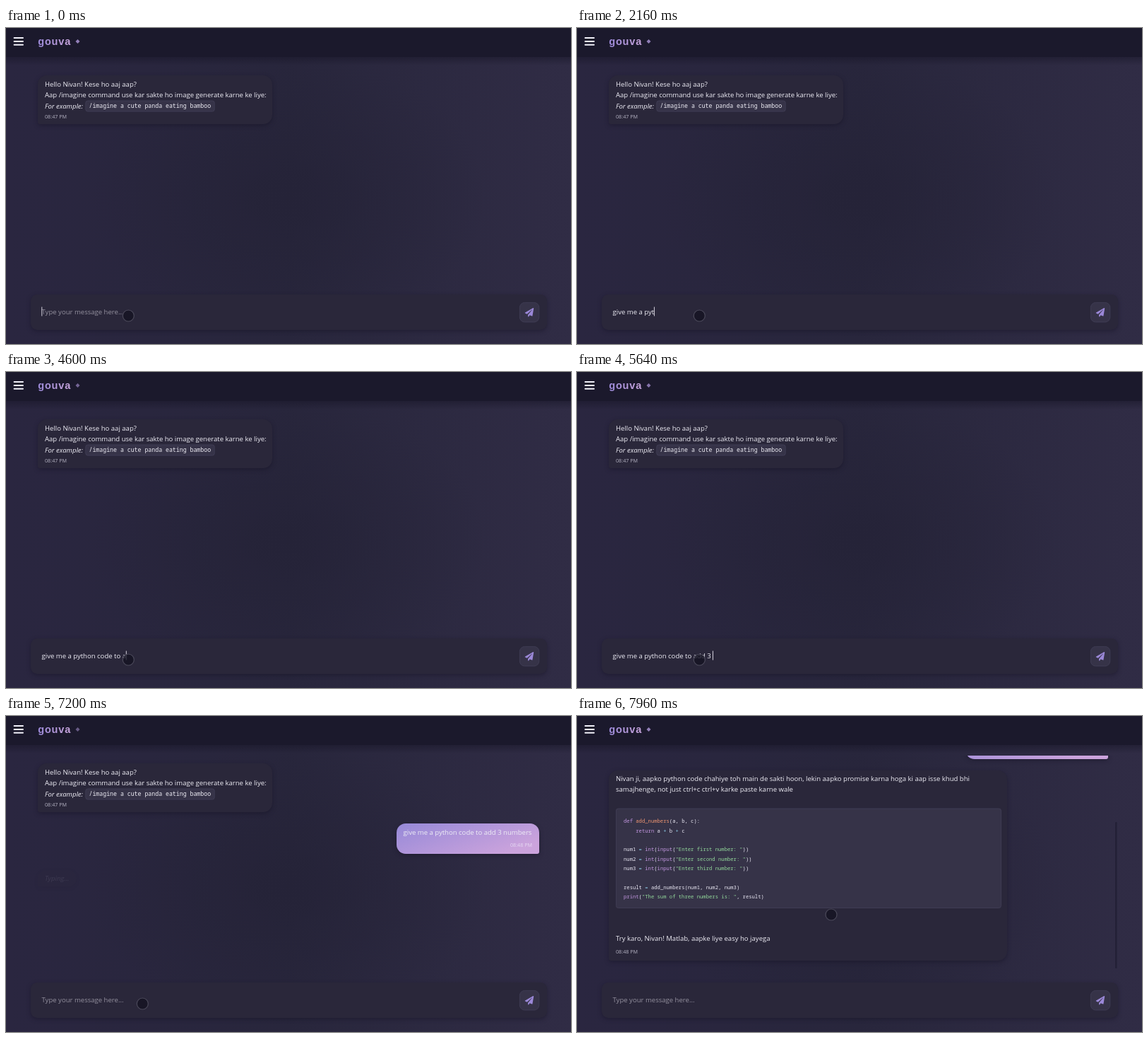
These frames come from a looping animation (800x447 px, 8000 ms). An HTML page:

```html
<!DOCTYPE html>
<html lang="en">
<head>
<meta charset="utf-8">
<title>Chat</title>
<style>
html, body { margin: 0; width: 100%; height: 100%; overflow: hidden; background: #28253b; }
svg { display: block; width: 100vw; height: 100vh; }
text { font: 9.55px "Open Sans", "Noto Sans", sans-serif; fill: #eeedf5; white-space: pre; }
.i { font-style: italic; }
.time { font-size: 7.2px; fill: #b4b2c2; }
.hint { fill: #94919f; }
.chip { font: 500 8.23px "Noto Sans Mono", monospace; }
.code { font: 7.21px "Noto Sans Mono", monospace; fill: #e8e6f2; }
.key { fill: #c296e0; } .str { fill: #93d99b; } .op { fill: #8cc8e4; } .fn { fill: #ee9470; }
.title { font: bold 14.5px "Liberation Sans", Arial, sans-serif; letter-spacing: .8px; fill: url(#brand); }
.sh { filter: drop-shadow(0 2px 3px rgba(12, 10, 26, .35)); }
.panel { fill: #2a273a; }
.block { fill: #363348; stroke: #434058; stroke-width: .8; }
</style>
</head>
<body>
<svg id="stage" viewBox="0 0 800 447"></svg>
<script>
const LOOP = 8000, SEND = 6760, WAIT = 7120, REPLY = 7460;
const MESSAGE = "give me a python code to add 3 numbers";
// time at which each character of MESSAGE is typed
const KEYS = [
  560, 700, 820, 940, 1080, 1240, 1440, 1520, 1600, 1720,
  1880, 2000, 2120, 2360, 2480, 2640, 2720, 2900, 3040, 3180, 3320, 3440,
  3920, 4080, 4240, 4560, 4760, 4880, 5040, 5180, 5560,
  6000, 6100, 6280, 6360, 6440, 6520, 6600
];
const CODE = `def add_numbers(a, b, c):
    return a + b + c

num1 = int(input("Enter first number: "))
num2 = int(input("Enter second number: "))
num3 = int(input("Enter third number: "))

result = add_numbers(num1, num2, num3)
print("The sum of three numbers is: ", result)`;

const text = (x, y, s, cls = "") => `<text x="${x}" y="${y}" class="${cls}">${s}</text>`;
const box = (x, y, w, h, r, attrs) =>
  `<rect x="${x}" y="${y}" width="${w}" height="${h}" rx="${r}" ${attrs}/>`;

// rounded bubble with one tight bottom corner
function bubble(x, y, w, h, mine) {
  const r = Math.min(13, h / 2), right = mine ? 3 : r, left = mine ? r : 3;
  return `<path class="sh ${mine ? "" : "panel"}" ${mine ? 'fill="url(#mine)"' : ""}
    d="M${x + r} ${y}h${w - 2 * r}a${r} ${r} 0 0 1 ${r} ${r}v${h - r - right}
    a${right} ${right} 0 0 1 ${-right} ${right}h${right + left - w}
    a${left} ${left} 0 0 1 ${-left} ${-left}v${r + left - h}a${r} ${r} 0 0 1 ${r} ${-r}z"/>`;
}

const span = (cls, s) => `<tspan class="${cls}">${s}</tspan>`;
const paint = line => line.replace(
  /("[^"]*")|\b(def|return|int|input|print)\b|([=+])/g,
  (m, str, key) => span(str ? "str" : key ? "key" : "op", m)
).replace(/(<\/tspan> )(add_numbers)(?=\(a)/, (m, a, b) => a + span("fn", b));

const codeLines = CODE.split("\n")
  .map((line, i) => text(66, 285.2 + i * 13.33, paint(line), "code")).join("");

const stage = document.getElementById("stage");
stage.innerHTML = `
<defs>
  <linearGradient id="back">
    <stop stop-color="#2a2640"/><stop offset=".5" stop-color="#28263c"/><stop offset="1" stop-color="#302c45"/>
  </linearGradient>
  <radialGradient id="dim" cx=".5" cy=".5" r=".5">
    <stop stop-color="#232135" stop-opacity=".6"/><stop offset="1" stop-color="#232135" stop-opacity="0"/>
  </radialGradient>
  <linearGradient id="shade" x2="0" y2="1">
    <stop stop-color="#171527" stop-opacity=".55"/><stop offset="1" stop-color="#171527" stop-opacity="0"/>
  </linearGradient>
  <linearGradient id="brand"><stop stop-color="#9b89d8"/><stop offset="1" stop-color="#c8a5dd"/></linearGradient>
  <linearGradient id="mine" x2="1" y2=".6"><stop stop-color="#9689d8"/><stop offset="1" stop-color="#cba3dc"/></linearGradient>
  <clipPath id="view">${box(0, 56, 800, 306, 0, "")}</clipPath>
</defs>
${box(0, 0, 800, 447, 0, 'fill="url(#back)"')}
${box(120, 40, 560, 400, 0, 'fill="url(#dim)"')}
${box(0, 40, 800, 13, 0, 'fill="url(#shade)"')}
${box(0, 0, 800, 41, 0, 'fill="#1b192c"')}
<path d="M11.6 14h12.4M11.6 18.9h12.4M11.6 23.8h12.4" stroke="#f0eff8" stroke-width="2" stroke-linecap="round"/>
${text(45.3, 24, "gouva", "title")}
<path id="gem" d="M101.5 16l3 3-3 3-3-3z" fill="#a18ccb"/>

<g clip-path="url(#view)">
  <g id="chat">
    ${bubble(45, 67, 332, 69)}
    ${text(55, 83.2, "Hello Nivan! Kese ho aaj aap?")}
    ${text(55, 98, "Aap /imagine command use kar sakte ho image generate karne ke liye:")}
    ${text(55, 113.6, "For example:", "i")}
    ${box(112.8, 103, 182.4, 15, 3, 'class="block"')}
    ${text(117.5, 113.4, "/imagine a cute panda eating bamboo", "chip")}
    ${text(55, 128.2, "08:47 PM", "time")}
    <g id="sent">
      ${bubble(553, 152, 202, 43, true)}
      ${text(562.5, 168, MESSAGE)}
      <text x="745" y="185" class="time" text-anchor="end" style="fill:#e6d8f2">08:48 PM</text>
    </g>
    <g id="wait">
      ${bubble(45, 211, 55, 24)}
      ${text(55, 226.4, "Typing...", "i hint")}
    </g>
    <g id="reply">
      ${bubble(45, 211, 564, 269)}
      ${text(55, 226, "Nivan ji, aapko python code chahiye toh main de sakti hoon, lekin aapko promise karna hoga ki aap isse khud bhi")}
      ${text(55, 241.3, "samajhenge, not just ctrl+c ctrl+v karke paste karne wale")}
      ${box(55.4, 265, 545, 140.5, 3, 'class="block"')}
      ${codeLines}
      ${text(55, 452, "Try karo, Nivan! Matlab, aapke liye easy ho jayega")}
      ${text(55, 469.6, "08:48 PM", "time")}
    </g>
  </g>
</g>
<rect id="thumb" x="762" width="2.5" height="207" rx="1.2" fill="#232036"/>

${box(35, 377, 731, 50, 9, 'class="panel sh"')}
${box(727.4, 388.4, 27.4, 27.6, 7, 'class="block"')}
<path transform="translate(734.8 396) scale(.0242)" fill="#9b88d8" d="M476 3L12 271c-18 10-16 35 2 43l107 44 287-253c6-5 14 3 9 8L176 407v80c0 24 28 33 42 16l64-77 125 52c14 6 30-3 33-18l72-432C515 8 493-7 476 3z"/>
${text(50.5, 405, "Type your message here...", "hint")}
${text(50.5, 405, "", "")}
<path id="caret" d="M0 394.5v13" stroke="#e8e6f0" stroke-width=".9"/>
<circle id="mouse" r="8" fill="#141322" fill-opacity=".8" stroke="#4b495a" stroke-width="1.2"/>`;

const [gem, chat, sent, wait, reply, thumb, caret, mouse] =
  ["gem", "chat", "sent", "wait", "reply", "thumb", "caret", "mouse"].map(id => document.getElementById(id));
const [hint, typed] = stage.querySelectorAll(":scope > text:not(.title)");

const ramp = (t, from, to) => Math.max(0, Math.min(1, (t - from) / (to - from)));
const smooth = p => p * p * (3 - 2 * p);
const show = (el, on) => el.setAttribute("visibility", on ? "visible" : "hidden");
const move = (el, x, y) => el.setAttribute("transform", `translate(${x} ${y})`);

// fade in while rising into place
function enter(el, t, start, x = 0) {
  const p = smooth(ramp(t, start, start + 300));
  el.setAttribute("opacity", p);
  move(el, x, 8 * (1 - p));
}

function draw(t) {
  const count = t < SEND ? KEYS.filter(k => k <= t).length : 0;
  const lastKey = count ? KEYS[count - 1] : -300;
  typed.textContent = MESSAGE.slice(0, count);
  show(hint, !count);
  show(caret, t < SEND && (t - lastKey) % 1000 < 500);
  move(caret, 50.8 + (count ? typed.getComputedTextLength() : 0), 0);

  const replied = t >= REPLY;
  enter(sent, t, SEND, replied ? -3 : 0);
  enter(wait, t, WAIT);
  enter(reply, t, REPLY);
  show(wait, t >= WAIT && !replied);

  const scroll = smooth(ramp(t, REPLY + 40, 7900));
  move(chat, 0, -134 * scroll);
  show(thumb, replied);
  thumb.setAttribute("y", 56 + 94 * scroll);

  const glide = smooth(ramp(t, 7300, 7900));
  move(mouse, 173.3 + 20 * smooth(ramp(t, 7000, 7200)) + 166.7 * glide, 407 - 126 * glide);

  gem.setAttribute("opacity", .72 + .18 * Math.cos(t * Math.PI / 1000));
}

function frame() {
  draw(performance.now() % LOOP);
  requestAnimationFrame(frame);
}
frame();
</script>
</body>
</html>
```
